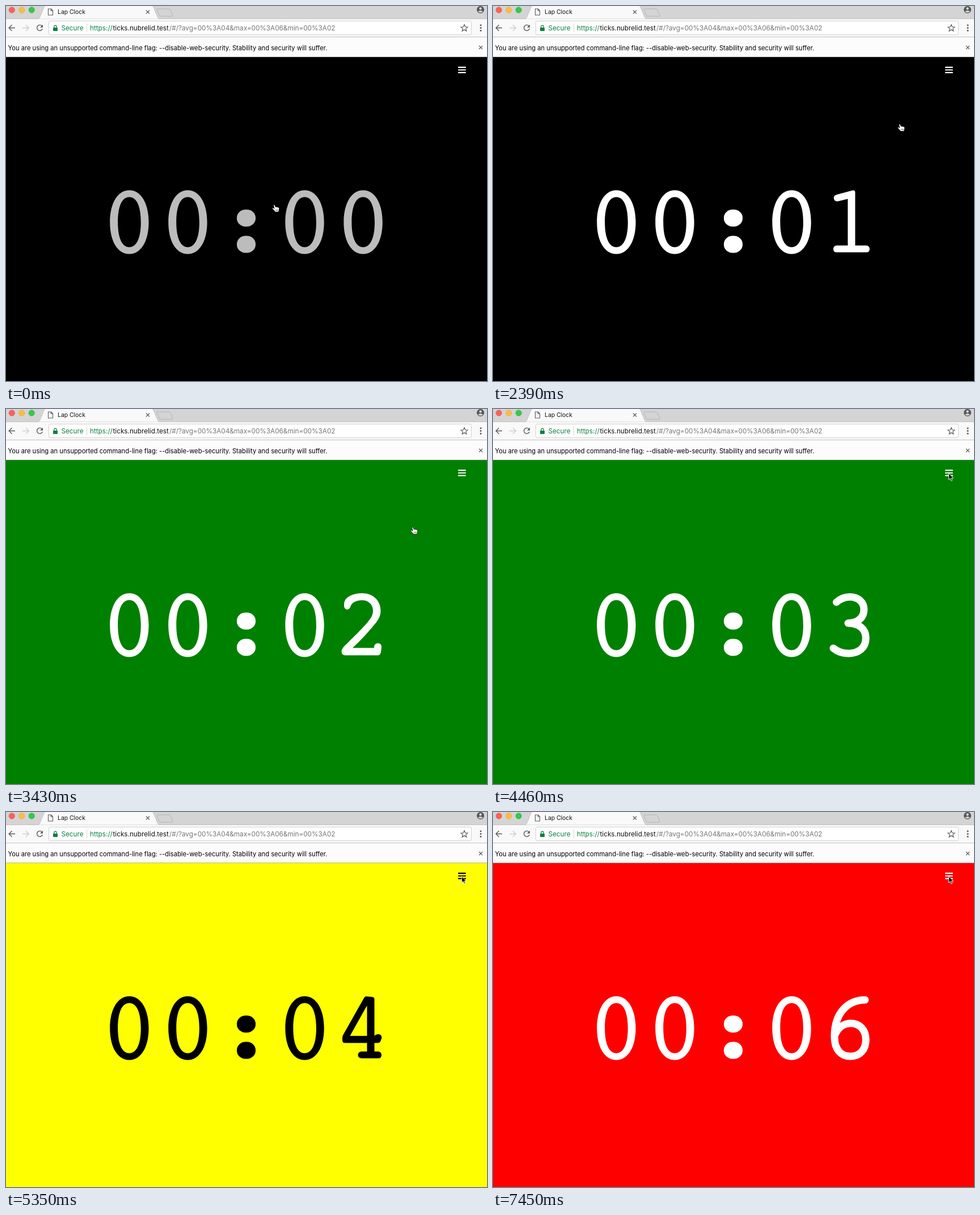
An HTML page for the animation above (8000 ms loop, 848 by 660 pixels).

```html
<!DOCTYPE html>
<html lang="en">
<head>
<meta charset="utf-8">
<title>Lap Clock</title>
<style>
html, body { margin: 0; width: 100%; height: 100%; overflow: hidden; background: #000; }
svg { display: block; }
text { font-family: Inter, Roboto, sans-serif; white-space: pre; }
.title { font-size: 10.4px; fill: #111; }
.url { font-size: 11.74px; }
.bar { font-size: 11.16px; fill: #000; }
.line { fill: none; stroke: #5a5a5a; stroke-width: 1.4; }
.x { fill: none; stroke: #5c5c5c; stroke-width: 1.2; }
.ink { fill: currentColor; }
.pen { fill: none; stroke: currentColor; stroke-width: 13; stroke-linecap: round; stroke-linejoin: round; }

.page, .digits, .count, .cursor, .hand, .arrow { animation: 8s step-end infinite; }
.page { animation-name: page; }
.digits { animation-name: start; }
.count { animation-name: count; }
.cursor { animation-name: move; }
.hand { animation-name: hand; }
.arrow { animation-name: arrow; }

@keyframes page {
  0% { fill: #000; color: #fff; }
  42.875% { fill: #008000; color: #fff; }
  66.875% { fill: #ff0; color: #000; }
  93.125%, 100% { fill: #f00; color: #fff; }
}
@keyframes start {
  0% { opacity: .74; }
  18.75%, 100% { opacity: 1; }
}
@keyframes count {
  0% { transform: translateX(0); }
  29.875% { transform: translateX(-100px); }
  42.875% { transform: translateX(-200px); }
  55.75% { transform: translateX(-300px); }
  66.875% { transform: translateX(-400px); }
  80% { transform: translateX(-500px); }
  93.125%, 100% { transform: translateX(-600px); }
}
@keyframes move {
  0% { transform: translate(469px, 349px); }
  22.375% { transform: translate(514px, 301px); }
  24.25% { transform: translate(594px, 264px); }
  26.125% { transform: translate(598px, 264px); }
  28% { transform: translate(635px, 239px); }
  29.875% { transform: translate(713px, 207px); }
  44.75% { transform: translate(718.5px, 200.5px); }
  46.625% { transform: translate(774px, 144.5px); }
  48.375% { transform: translate(794.5px, 118px); }
  50.25% { transform: translate(797.5px, 117px); }
  52% { transform: translate(803.5px, 113px); }
  53.875%, 100% { transform: translate(802.8px, 112.4px); }
}
@keyframes hand {
  0% { visibility: visible; }
  48.375%, 100% { visibility: hidden; }
}
@keyframes arrow {
  0% { visibility: hidden; }
  48.375%, 100% { visibility: visible; }
}
</style>
</head>
<body>
<svg width="848" height="660" viewBox="0 0 848 660">
  <defs>
    <path id="zero" class="ink" fill-rule="evenodd" d="M183.200 380.500C183.200 347 197 324.200 217.400 324.200S251.600 347 251.600 380.500S238 436.500 217.400 436.500S183.200 414 183.200 380.500Z
      M197.200 380.500C197.200 408 204.500 424.500 217.400 424.500S237.800 408 237.800 380.500S230.500 336.300 217.400 336.300S197.200 353 197.200 380.500Z"/>
    <rect id="dot" class="ink" x="407" width="33" height="30" rx="15.6" ry="14.3"/>
    <path id="cross" class="x" d="M-3-3L3 3M3-3L-3 3"/>
  </defs>

  <!-- tab strip -->
  <rect width="848" height="23" fill="#d4d4d4"/>
  <path d="M0 22.5H848" stroke="#c0c0c0"/>
  <path d="M56 23Q59 22 60 19L67 2Q68 0 70-1H257Q259 0 260 2L267 19Q268 22 271 23Z" fill="#f9f9f9" stroke="#b9b9b9" stroke-width=".8"/>
  <path d="M267 5H287Q289 5 290 7L294 16.5Q294.500 18 293 18H273Q271 18 270 16L266 6.500Q265.500 5 267 5Z" fill="#d4d4d4" stroke="#b0b0b0" stroke-width=".9"/>
  <g stroke-width=".5">
    <circle cx="10.300" cy="7" r="5.200" fill="#fc605c" stroke="#de4a45"/>
    <circle cx="27.800" cy="7" r="5.200" fill="#fdbc40" stroke="#dc9f36"/>
    <circle cx="45.200" cy="7" r="5.200" fill="#34c84a" stroke="#27a639"/>
  </g>
  <path class="line" style="stroke-width:1.1" d="M74.500 5H79.500L82.500 8V16H74.500ZM79.300 5V8.300H82.500"/>
  <text class="title" x="91" y="14">Lap Clock</text>
  <use href="#cross" x="250" y="10.500"/>
  <circle cx="836.500" cy="6.500" r="6.500" fill="#555"/>
  <circle cx="836.500" cy="4.500" r="2.200" fill="#d4d4d4"/>
  <path d="M832 9.800Q836.500 6 841 9.800Q836.500 13.500 832 9.800Z" fill="#d4d4d4"/>

  <!-- toolbar -->
  <rect y="23" width="848" height="32" fill="#f9f9f9"/>
  <path class="line" d="M16 38.500H5.500M10.500 33.200L5.200 38.500L10.500 43.800"/>
  <path class="line" style="stroke:#cfcfcf" d="M29 38.500H40M35 33.200L40.300 38.500L35 43.800"/>
  <path class="line" d="M63.300 35A5 5 0 1 0 64.300 40"/>
  <path d="M65 32.800V37.800H60Z" fill="#5a5a5a"/>
  <rect x="75.500" y="26.500" width="745" height="24" rx="2.500" fill="#fff" stroke="#d0d0d0"/>
  <rect x="83" y="38" width="8" height="6" rx=".8" fill="#0b8043"/>
  <path d="M84.800 38V36.300A2.200 2.200 0 0 1 89.200 36.300V38" fill="none" stroke="#0b8043" stroke-width="1.200"/>
  <path d="M142.500 31V46" stroke="#d5d5d5"/>
  <g class="url" fill="#0b8043">
    <text x="97.500" y="43">Secure</text>
    <text x="148" y="43">https://</text>
    <text x="188.500" y="43" fill="#111">ticks.nubrelid.test</text>
    <text x="288" y="43" fill="#757575">/#/?avg=00%3A04&amp;max=00%3A06&amp;min=00%3A02</text>
  </g>
  <path class="line" style="stroke-width:1.200" d="M808 32.800L809.700 36.800L814 37.100L810.700 39.900L811.800 44.100L808 41.800L804.200 44.100L805.300 39.900L802 37.100L806.300 36.800Z"/>
  <g fill="#5a5a5a">
    <circle cx="837" cy="33.700" r="1.500"/>
    <circle cx="837" cy="38.500" r="1.500"/>
    <circle cx="837" cy="43.300" r="1.500"/>
  </g>

  <!-- notice -->
  <rect y="54" width="848" height="1" fill="#c0c0c0"/>
  <rect y="55" width="848" height="35" fill="#fcfcfc"/>
  <text class="bar" x="3.500" y="77.500">You are using an unsupported command-line flag: --disable-web-security. Stability and security will suffer.</text>
  <use href="#cross" x="837" y="73"/>
  <rect y="89" width="848" height="1" fill="#b6b6b6"/>

  <!-- timer -->
  <g class="page">
    <rect y="90" width="848" height="570"/>
    <g class="ink">
      <rect x="797" y="106.800" width="13.800" height="2.200" rx=".6"/>
      <rect x="797" y="111.400" width="13.800" height="2.200" rx=".6"/>
      <rect x="797" y="116" width="13.800" height="2.200" rx=".6"/>
    </g>
    <g class="digits" role="img" aria-label="Elapsed time">
      <use href="#zero"/>
      <use href="#zero" x="103.050"/>
      <use href="#dot" y="358.300"/>
      <use href="#dot" y="404.500"/>
      <use href="#zero" x="309.150"/>
      <svg x="585" y="320" width="90" height="120" viewBox="585 320 90 120">
        <g class="count">
          <use href="#zero" x="412.200"/>
          <path class="ink" transform="translate(100)" d="M636 324.500Q638.500 325 638.500 328V421.500H658Q664 422 664 428Q664 433.500 658 433.500H606Q600 433.500 600 428Q600 422 606 421.500H625.500V339.500L609 343.500Q602 345 601 339Q600 333.500 606 332L632 325Q634 324.300 636 324.500Z"/>
          <path class="ink" transform="translate(200)" d="M596 346V342Q597 334 606 329C612 326 619 324.200 628 324.200C647 324.200 660.500 337 660.500 355C660.500 364 657 371 649 380C640 391 625 408 611 420.500H649V418Q650 412.300 656 412.300Q662 412.500 662 419L661 428Q660 433.500 655 433.500H598Q592 433.500 591.500 427Q592 422 596 418C612 402 632 383 640 372C645 366 647 361 647 355C647 344 639 336.500 627 336.500C619 336.500 611 340 608 346Q606 353 601.500 353Q596 352 596 346Z"/>
          <path class="pen" transform="translate(300)" d="M605.500 340Q616 330.700 629 330.700C644 330.700 654 340 654 353C654 367 643 377 626 377C645 377 657.300 387 657.300 403C657.300 420 645 430.200 627 430.200Q611 430.200 600 421"/>
          <path class="ink" fill-rule="evenodd" transform="translate(400)" d="M635 324.500L646 325.500Q649.500 326 649.500 330V394Q652 391 657 391Q663 392 662.300 398L660.500 403Q659 406.500 655 406.500H649.500V421.500H656Q662 422 662 428Q662 433.500 656 433.500H627Q620.500 433 620.500 427.500Q621 422 627 421.500H636.500V406.500H598Q593 406.500 593 402V398Q593 395 594 393L631 327.500Q632.500 324.500 635 324.500ZM636.500 340.500L606.500 394H636.500Z"/>
          <path class="pen" transform="translate(500)" d="M650.500 334H605V376.500Q616 370 630 370C647 370 657.700 382 657.700 399C657.700 419 645 430.300 626 430.300Q610 430.300 599 422.500"/>
          <path class="pen" transform="translate(600)" d="M656 330.700C625 331 602 354 602 395C602 419 614 430 630 430C647 430 657.300 418 657.300 401C657.300 383 646 372 631 372C620 372 609 378 603.500 391"/>
        </g>
      </svg>
    </g>
  </g>

  <g class="cursor">
    <g class="hand" stroke="#000" stroke-width=".8" stroke-linejoin="round">
      <path fill="#fff" d="M2.600 1.600C3.600 .4 4.800 .8 5.300 2.200L6.200 4.800C7 4.200 8 4.400 8.400 5C9.200 4.500 10.200 4.900 10.500 5.600C11.600 5.300 12.600 6 12.700 7L12.500 10L11.300 13.500H5.600C4.600 11.400 2.400 9.800 .6 7.800C.2 6.600 1.600 5.800 2.600 6.600L3.900 7.600Z"/>
      <path d="M6.700 9.200V11.700M8.500 9V11.700M10.300 8.800V11.600" fill="none" stroke-width=".6"/>
    </g>
    <path class="arrow" fill="#000" stroke="#fff" stroke-width="1" d="M.6 .6V12L3.200 9.700L5 13.900L7 13L5.200 9H8.800Z"/>
  </g>
</svg>
</body>
</html>
```
